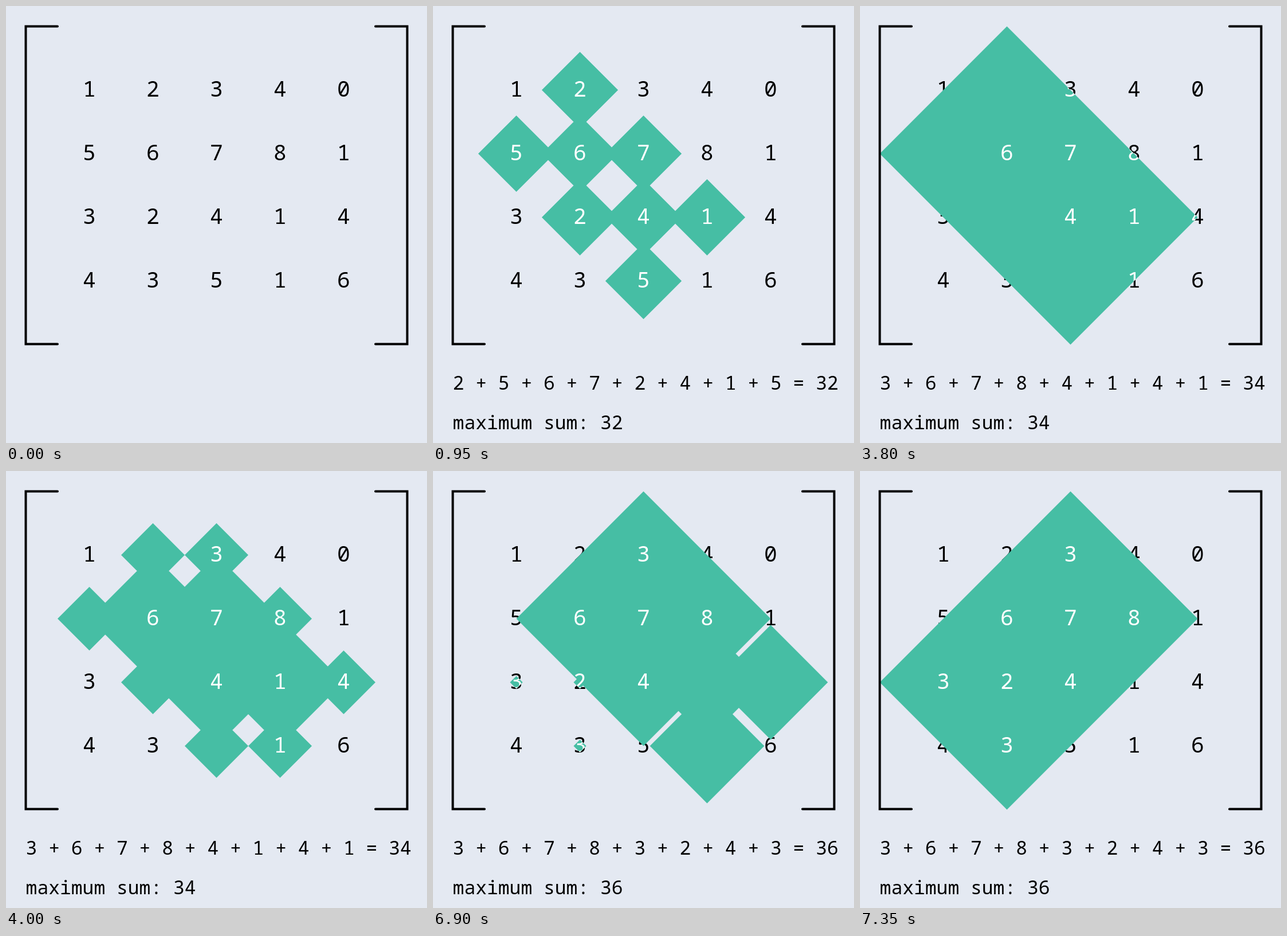
Write an HTML page that moves like this. It is 735 px wide and 762 px high and loops after 8 s.

```html
<!DOCTYPE html>
<html lang="en">
<head>
<meta charset="utf-8">
<title>Maximum rhombus sum</title>
<style>
  html, body { margin: 0; width: 100%; height: 100%; overflow: hidden; background: #e4e9f2; }
  svg { display: block; width: 100%; height: 100%; }
  text { font: 33px "Noto Sans Mono", "DejaVu Sans Mono", monospace; }
  g text { font-size: 38px; text-anchor: middle; }
</style>
</head>
<body>
<svg viewBox="0 0 735 762">
  <clipPath id="clip"><path id="window"/></clipPath>
  <g id="digits"></g>
  <path id="diamonds" fill="#46bea4"/>
  <g id="picked" fill="#fff" clip-path="url(#clip)"></g>
  <path d="M90 35.5H34.5V589.5H90M645 35.5H700.5V589.5H645"
        fill="none" stroke="#000" stroke-width="4" stroke-linecap="round"/>
  <text id="terms" x="34.6" y="669"></text>
  <text id="total" x="34.6" y="738"></text>
</svg>
<script>
const LOOP = 8000, TICK = 50, GROW = 400, STEP = 111;
const grid = [1, 2, 3, 4, 0, 5, 6, 7, 8, 1, 3, 2, 4, 1, 4, 4, 3, 5, 1, 6];

// at: when the numbers switch; grow: when the diamonds begin to resize
const stages = [
  { at: 0, grow: -GROW, cells: [] },
  { at: 750, grow: 710, cells: [1, 5, 6, 7, 11, 12, 13, 17] },
  { at: 3800, grow: 3800, cells: [2, 6, 7, 8, 12, 13, 14, 18] },
  { at: 6900, grow: 6860, cells: [2, 6, 7, 8, 10, 11, 12, 16] }
];

const el = id => document.getElementById(id);
const centre = i => [145.5 + STEP * (i % 5), 146.5 + STEP * Math.floor(i / 5)];

function addDigits(group) {
  return grid.map((n, i) => {
    const text = document.createElementNS("http://www.w3.org/2000/svg", "text");
    const [x, y] = centre(i);
    text.setAttribute("x", x);
    text.setAttribute("y", y + 11.3);
    text.textContent = n;
    return group.appendChild(text);
  });
}

function diamond(i, scale) {
  const [x, y] = centre(i), r = STEP * scale;
  return scale > 0 ? `M${x} ${y - r}l${r} ${r}l${-r} ${r}l${-r} ${-r}z` : "";
}

addDigits(el("digits"));
const picked = addDigits(el("picked"));
const start = performance.now();

function draw(now) {
  const t = Math.floor(Math.max(0, now - start) % LOOP / TICK) * TICK;
  const k = stages.filter(s => t >= s.at).length - 1;
  const { grow, cells } = stages[k];
  const before = k ? stages[k - 1].cells : [];
  const p = Math.min(1, (t - grow) / GROW);

  const shape = grid.map((_, i) => {
    const was = before.includes(i), is = cells.includes(i);
    return diamond(i, was && is ? 1 : is ? p : was ? 1 - p : 0);
  }).join("");
  el("diamonds").setAttribute("d", shape);
  el("window").setAttribute("d", shape);
  picked.forEach((text, i) => text.style.display = cells.includes(i) ? "" : "none");

  const values = cells.map(i => grid[i]);
  const sum = values.reduce((a, b) => a + b, 0);
  el("terms").textContent = k ? `${values.join(" + ")} = ${sum}` : "";
  el("total").textContent = k ? `maximum sum: ${sum}` : "";
  requestAnimationFrame(draw);
}
draw(start);
</script>
</body>
</html>
```
